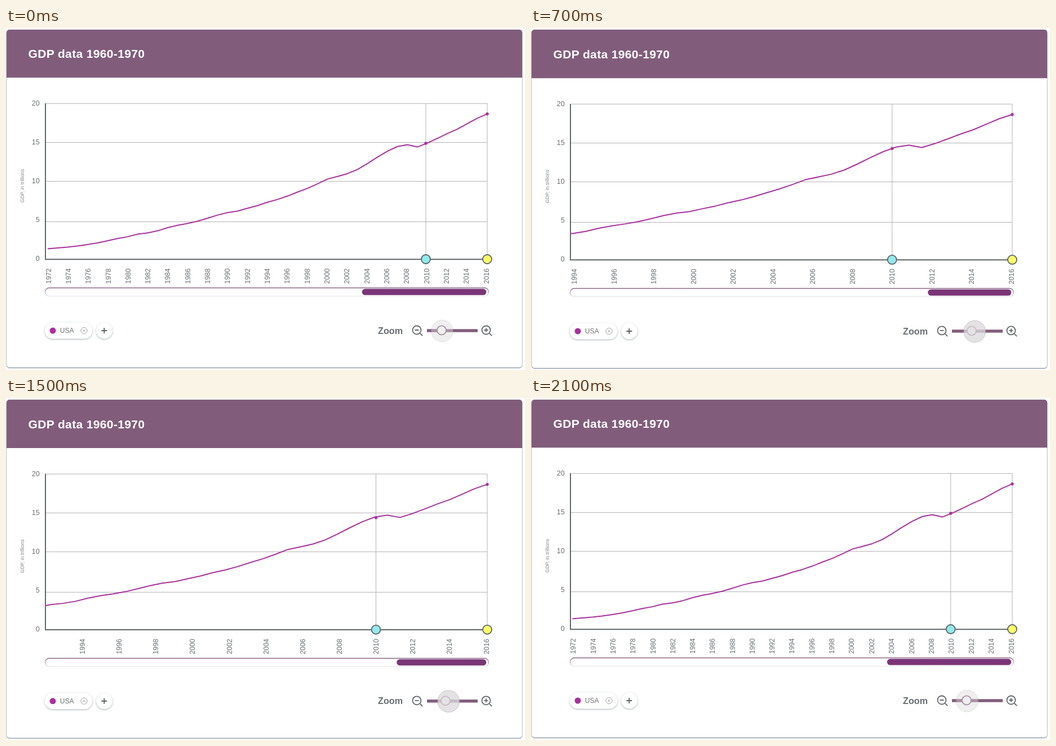
Write an HTML page that moves like this. It is 921x608 px and loops after 2.2 s.

```html
<!DOCTYPE html>
<html lang="en">
<head>
<meta charset="utf-8">
<title>GDP chart zoom</title>
<style>
  html, body { margin: 0; width: 100%; height: 100%; overflow: hidden; background: #fff; }
  svg { display: block; width: 921px; height: 608px; font-family: "Liberation Sans", Arial, sans-serif; }
  text { fill: #6a6e72; }
  .title { font: bold 21px "Liberation Sans", Arial, sans-serif; letter-spacing: .36px; fill: #fff; }
  .tick { font-size: 12.5px; text-anchor: end; }
  .year { font-size: 12.3px; text-anchor: middle; }
  .unit { font-size: 8.85px; text-anchor: middle; fill: #85888b; }
  .zoom { font: bold 16.2px "Liberation Sans", Arial, sans-serif; }
  .grid { stroke: #b2b2b2; stroke-width: 1; }
  .axis { stroke: #5f6568; stroke-width: 2; fill: none; }
  .icon { stroke: #62676b; stroke-width: 1.8; fill: none; }
  .handle { stroke: #59656a; stroke-width: 1.8; }
  .card { filter: drop-shadow(.6px 1.4px .7px #8d9ca3); }
  .pill { fill: #fff; filter: drop-shadow(.5px 1.5px 1.6px rgba(80, 95, 105, .5)); }
</style>
</head>
<body>
<svg viewBox="0 0 921 608">
  <defs>
    <linearGradient id="rim" x1="0" y1="0" x2="0" y2="1">
      <stop offset="0" stop-color="#8b6987"/>
      <stop offset=".5" stop-color="#b9a6b7"/>
      <stop offset="1" stop-color="#ece8ec"/>
    </linearGradient>
    <clipPath id="plot"><rect x="69" y="120" width="790" height="300"/></clipPath>
  </defs>

  <rect class="card" id="card" x="1" y="3" width="915" height="600.5" rx="5" fill="#fff" stroke="#c3cacd" stroke-width=".8"/>
  <path id="header" fill="#815d7b"/>

  <g id="body">
    <text class="title" x="39.5" y="53.3">GDP data 1960-1970</text>
    <text class="unit" transform="translate(32 280.5) rotate(-90)">GDP, in trillions</text>
    <g id="grid"></g>
    <line class="grid" x1="854" x2="854" y1="134" y2="411"/>
    <line class="grid" id="guide" y1="134" y2="411"/>
    <path class="axis" d="M70 134V411.3H854"/>
    <path id="curve" clip-path="url(#plot)" fill="none" stroke="#a8309f" stroke-width="2" stroke-linejoin="round"/>
    <circle id="dot" r="2.7" fill="#a8309f"/>
    <circle cx="854" cy="152.8" r="2.7" fill="#a8309f"/>
    <circle class="handle" id="start" cy="411" r="8" fill="#93e9ea"/>
    <circle class="handle" cx="854" cy="411" r="8" fill="#ffff66"/>
    <g id="years"></g>

    <rect x="69.5" y="462" width="787" height="14.6" rx="7.3" fill="#fff" stroke="url(#rim)" stroke-width="1.4"/>
    <rect id="range" y="463.8" height="11" rx="5.5" fill="#7a3577"/>

    <rect class="pill" x="68.5" y="523.5" width="85" height="29" rx="14.5"/>
    <circle cx="83" cy="538" r="5.5" fill="#a8309f"/>
    <text x="95.8" y="542.4" font-size="12">USA</text>
    <g fill="none" stroke="#999da0" stroke-width="1">
      <circle cx="138.5" cy="538" r="5.6"/>
      <path d="M136.3 535.8l4.4 4.4m0-4.4l-4.4 4.4"/>
    </g>
    <circle class="pill" cx="174.5" cy="538" r="14.5"/>
    <path d="M169.3 538h10m-5-5v10" stroke="#5c6367" stroke-width="1.9"/>

    <text class="zoom" x="660" y="543.7">Zoom</text>
    <path class="icon" d="M735 543l4.2 4.2M725.5 537h7"/>
    <circle class="icon" cx="729" cy="537" r="7.5"/>
    <path class="icon" d="M858 543l4.2 4.2M848.5 537h7m-3.5-3.5v7"/>
    <circle class="icon" cx="852" cy="537" r="7.5"/>
    <rect x="747" y="535.3" width="90" height="5.4" fill="#815d7b"/>
    <circle id="knob" cy="537.4" r="8" fill="#fff" stroke="#815d7b" stroke-width="1.8"/>
    <circle id="halo" cy="538.5" r="19.3" fill="#dcdadc" stroke="#b5b0b5" stroke-width="1"/>
  </g>
</svg>
<script>
const $ = id => document.getElementById(id);
const set = (node, attrs) => {
  for (const key in attrs) node.setAttribute(key, attrs[key]);
  return node;
};
const add = (parent, tag, attrs, text = '') => {
  const node = set(document.createElementNS('http://www.w3.org/2000/svg', tag), attrs);
  node.textContent = text;
  parent.append(node);
  return node;
};
const mix = (a, b, p) => a + (b - a) * p;
const clamp = v => Math.max(0, Math.min(1, v));

// Yearly GDP in trillions, 1972 to 2016
const gdp = [
  1.33, 1.44, 1.55, 1.69, 1.88, 2.09, 2.36, 2.66, 2.88, 3.21, 3.37, 3.64, 4.04, 4.35, 4.59,
  4.87, 5.25, 5.66, 5.98, 6.17, 6.54, 6.88, 7.31, 7.66, 8.10, 8.61, 9.09, 9.66, 10.28, 10.62,
  10.98, 11.51, 12.27, 13.09, 13.86, 14.46, 14.7, 14.4, 14.9, 15.5, 16.13, 16.69, 17.4, 18.1, 18.64
];
const right = 854, yearWidth = 17.73;

// One pose per 100 ms step: zoom amount, knob place, halo strength
const zoom = [0, .002, .04, .13, .32, .58, .84, .99, .996, 1, 1];
const knobX = [773, 773, 773.3, 774, 775.5, 777.7, 780, 782, 792, 807, 817.5];
const haloAlpha = [.42, .42, .5, .58, .66, .76, .76, .76, .5, .22, 0];

const lines = [[20, 134.3], [15, 203.5], [10, 272.6], [5, 344.5]];
for (const [, y] of lines) add($('grid'), 'line', { class: 'grid', x1: 70, x2: right, y1: y, y2: y });
for (let v = 0; v <= 20; v += 5) add($('grid'), 'text', { class: 'tick', x: 59.7, y: 414.4 - v * 13.8 }, v);

const years = [];
for (let year = 1972; year <= 2016; year += 2) {
  years.push({ year, node: add($('years'), 'text', { class: 'year' }, year) });
}

// Years that leave the axis: 1978 to 1982 slide left, the later ones fade
const slide = { 1972: -190, 1974: -190, 1976: -190, 1978: -184, 1980: -157, 1982: -118 };

function placeYear({ year, node }, p) {
  const from = 852.3 - (2016 - year) * 17.66;
  let x = mix(from, 852.3 - (2016 - year) * 35.42, p), alpha = 1;
  if (year < 1994) {
    x = from + (slide[year] ?? -118 - (year - 1982) * 9) * p;
    alpha = year > 1982 ? clamp(1 - p / .45) : p < .7 ? 1 : 0;
  }
  if (x < 68) alpha = 0;
  set(node, { transform: `translate(${x + 4.3} 441) rotate(-90)`, opacity: alpha });
}

function draw(step) {
  const p = zoom[step], shift = p * .95;
  set($('body'), { transform: `translate(0 ${shift})` });
  set($('card'), { height: 600.5 + shift });
  set($('header'), { d: `M1 ${88.2 + shift}V8a5 5 0 0 1 5-5H911a5 5 0 0 1 5 5V${88.2 + shift}z` });

  const width = yearWidth * (1 + .296 * p);
  const points = gdp.map((v, i) => `${right - (gdp.length - 1 - i) * width} ${411 - v * 13.85}`);
  set($('curve'), { d: 'M' + points.join('L') });

  const x = mix(745, 639.7, p);
  set($('guide'), { x1: x, x2: x });
  set($('start'), { cx: x });
  set($('dot'), { cx: x, cy: mix(205, 213.4, p) });
  years.forEach(item => placeYear(item, p));

  const left = mix(631.7, 705, p);
  set($('range'), { x: left, width: 852.3 - left });
  set($('knob'), { cx: knobX[step] });
  set($('halo'), { cx: mix(774, 787.5, p), opacity: haloAlpha[step] });
}

// Zoom in, rest, zoom out with a short pause on the way
function stepAt(time) {
  const beat = Math.floor(time % 2200 / 100);
  if (beat <= 10) return beat;
  if (beat <= 15) return Math.min(10, 21 - beat);
  return 22 - beat;
}

const begin = performance.now();
function frame() {
  draw(stepAt(performance.now() - begin));
  requestAnimationFrame(frame);
}
frame();
</script>
</body>
</html>
```
